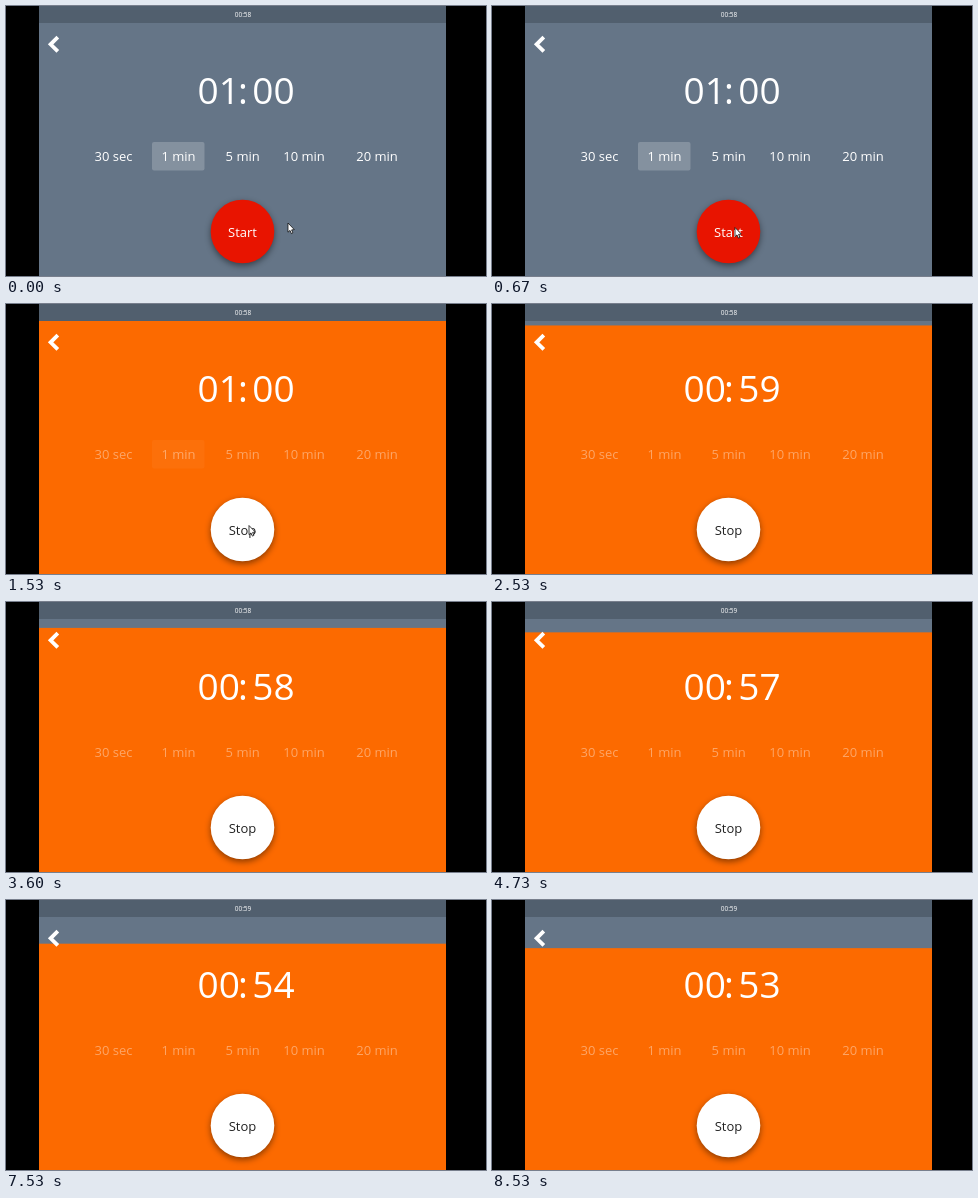
An HTML page with a canvas for the animation above (9.07 s loop, 480 px wide and 270 px high).

```html
<!DOCTYPE html>
<html lang="en">
<head>
<meta charset="utf-8">
<title>Timer</title>
<style>
html, body { margin: 0; width: 100%; height: 100%; overflow: hidden; background: #000; }
canvas { display: block; width: 480px; height: 270px; }
</style>
</head>
<body>
<canvas id="stage"></canvas>
<script>
const canvas = document.getElementById('stage');
const ctx = canvas.getContext('2d');
const ratio = window.devicePixelRatio || 1;
canvas.width = 480 * ratio;
canvas.height = 270 * ratio;

const LOOP = 9070;
const PRESS = 1395;
const RUN = 1525;
const LEFT = 33, WIDTH = 407, BAR = 17;
const FONT = '"Open Sans", "Noto Sans", sans-serif';
const BUTTON = { x: 236.5, y: 225.5, r: 31.8 };
const OPTIONS = [
  ['30 sec', 107.5], ['1 min', 172.5], ['5 min', 236.7],
  ['10 min', 298], ['20 min', 371]
];

const clamp = v => Math.max(0, Math.min(1, v));
const ease = v => { v = clamp(v); return v * v * (3 - 2 * v); };
const mix = (a, b, k) => a + (b - a) * k;
const pad = n => String(n).padStart(2, '0');

function rect(x, y, w, h, color) {
  ctx.fillStyle = color;
  ctx.fillRect(x, y, w, h);
}

function disc(x, y, r, color) {
  ctx.fillStyle = color;
  ctx.beginPath();
  ctx.arc(x, y, r, 0, Math.PI * 2);
  ctx.fill();
}

function text(str, x, y, size, color, align = 'center') {
  ctx.font = size + 'px ' + FONT;
  ctx.textAlign = align;
  ctx.fillStyle = color;
  ctx.fillText(str, x, y);
}

function drawBack() {
  ctx.strokeStyle = '#fff';
  ctx.lineWidth = 3.8;
  ctx.beginPath();
  ctx.moveTo(51.8, 31.2);
  ctx.lineTo(44.6, 38.3);
  ctx.lineTo(51.8, 45.4);
  ctx.stroke();
}

function drawTime(left) {
  const y = 98;
  text(pad(Math.floor(left / 60)), 191.5, y, 37, '#fff', 'left');
  text(':', 237, y, 37, '#fff');
  text(pad(left % 60), 246.3, y, 37, '#fff', 'left');
}

function drawOptions(t, running) {
  const glow = 0.2 * (1 - clamp((t - PRESS) / 170));
  if (glow > 0) {
    ctx.fillStyle = `rgba(255,255,255,${glow})`;
    ctx.beginPath();
    ctx.roundRect(146, 136, 52.5, 28.5, 2);
    ctx.fill();
  }
  const color = running ? 'rgba(255,255,255,0.4)' : '#fff';
  for (const [label, x] of OPTIONS) text(label, x, 155, 13, color);
}

function drawButton(t, running) {
  const { x, y, r } = BUTTON;
  ctx.save();
  ctx.shadowColor = 'rgba(0,0,0,0.45)';
  ctx.shadowBlur = 6 * ratio;
  ctx.shadowOffsetY = 2.5 * ratio;
  disc(x, y, r, running ? '#fff' : '#e81400');
  ctx.restore();
  if (!running && t >= PRESS) {
    ctx.save();
    ctx.beginPath();
    ctx.arc(x, y, r, 0, Math.PI * 2);
    ctx.clip();
    disc(240, 223.5, (t - PRESS + 5) * 0.4, 'rgba(255,255,255,0.3)');
    ctx.restore();
  }
  text(running ? 'Stop' : 'Start', x, 230.5, 13, running ? '#222' : '#fff');
}

function drawCursor(t) {
  if (t >= 2270) return;
  const arrive = ease(t / 670);
  const leave = ease((t - 1600) / 670);
  const x = mix(mix(282, 243, arrive), 300, leave);
  const y = mix(mix(217, 221.5, arrive), 275, leave);
  ctx.save();
  ctx.translate(x, y);
  ctx.beginPath();
  ctx.moveTo(0, 0);
  ctx.lineTo(0, 9.2);
  ctx.lineTo(2, 7.4);
  ctx.lineTo(3.4, 10.6);
  ctx.lineTo(4.9, 9.9);
  ctx.lineTo(3.6, 6.9);
  ctx.lineTo(6.3, 6.6);
  ctx.closePath();
  ctx.fillStyle = '#fff';
  ctx.fill();
  ctx.strokeStyle = '#111';
  ctx.lineWidth = 0.8;
  ctx.stroke();
  ctx.restore();
}

function draw(t) {
  const running = t >= RUN;
  const elapsed = running ? Math.floor((t - RUN) / 1000) : 0;
  ctx.setTransform(ratio, 0, 0, ratio, 0, 0);
  rect(0, 0, 480, 270, '#000');
  rect(LEFT, 0, WIDTH, 270, '#657587');
  if (running) {
    const top = BAR + elapsed * 4.45;
    rect(LEFT, top, WIDTH, 270 - top, '#fc6a00');
  }
  rect(LEFT, 0, WIDTH, BAR, '#515f6e');
  text(t < 4670 ? '00:58' : '00:59', 237, 10.6, 6.5, '#fff');
  drawBack();
  drawTime(60 - elapsed);
  drawOptions(t, running);
  drawButton(t, running);
  drawCursor(t);
}

const start = performance.now();
function tick() {
  draw((performance.now() - start) % LOOP);
  requestAnimationFrame(tick);
}
tick();
</script>
</body>
</html>
```
